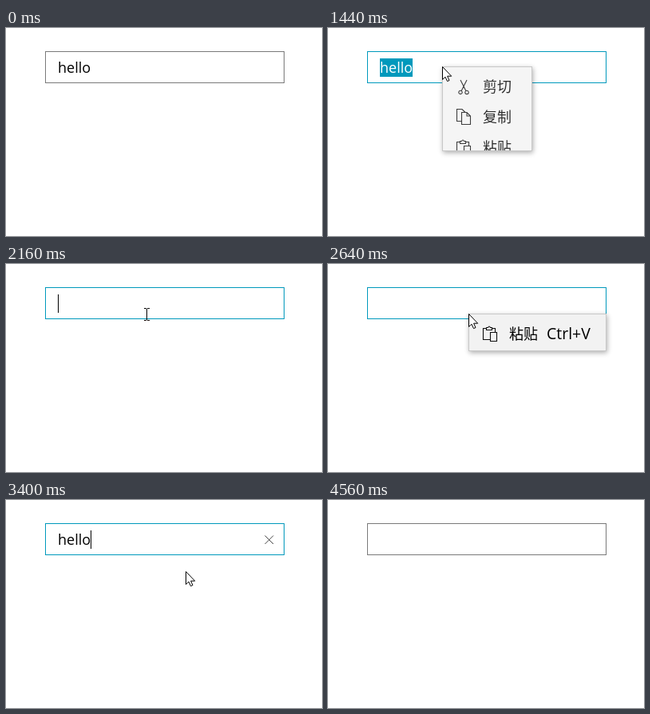
An HTML page that plays this animation: 396 px wide and 260 px high, repeating every 4.92 s.

```html
<!DOCTYPE html>
<html lang="zh-CN">
<head>
<meta charset="utf-8">
<style>
  html, body { margin: 0; width: 100%; height: 100%; overflow: hidden; background: #fff; }
  body { position: relative; }
  body > * { position: absolute; }
  svg { display: block; overflow: visible; }
  #scene { left: 0; top: 0; width: 396px; height: 260px; }
  .latin { font-family: "Open Sans", "Noto Sans", sans-serif; }
  .han { font: 18px "Noto Sans CJK SC", "Noto Sans CJK", sans-serif; }
  .menu { box-sizing: border-box; border: 1px solid #c8c8c8; overflow: hidden;
          box-shadow: 1px 2px 6px rgba(0, 0, 0, .32); }
  .menu svg { position: absolute; left: -1px; top: -1px; }
  .line { fill: none; stroke: #111; stroke-width: 1.1; }
</style>
</head>
<body>
<svg id="scene">
  <rect id="field" x="49.5" y="29.5" width="299" height="39" fill="#fff"/>
  <rect id="selection" x="65" y="38" width="41" height="23" fill="#0099bc"/>
  <text id="word" class="latin" x="65" y="56" font-size="18">hello</text>
  <g id="clear">
    <rect id="button" x="311" y="30" width="37" height="38"/>
    <path id="cross" d="M324.5 44.5l10.5 10.5M335 44.5l-10.5 10.5" fill="none"/>
  </g>
  <rect id="caret" y="38" width="1" height="23"/>
</svg>
<svg id="pointer" width="14" height="20" style="left:0;top:0">
  <path id="arrow" d="M.5.5V16.5L4 13.2L6.5 18.6L9 17.5L6.6 12.2H11.7Z" fill="#fff" stroke="#000"/>
  <path id="beam" d="M-3-6.5H0M1-6.5H4M.5-6V8M-3 8.5H0M1 8.5H4" fill="none" stroke="#000"/>
</svg>
<script>
const $ = id => document.getElementById(id);
const LOOP = 4920, STEP = 40, ACCENT = '#0099bc';
const clamp = v => Math.max(0, Math.min(1, v));
const show = (el, on) => el.style.display = on ? '' : 'none';

const icons = {
  cut: 'M5 2L11.8 15.4M13 2L6.2 15.4M7.2 17.4a2.2 2.2 0 1 1-4.4 0a2.2 2.2 0 1 1 4.4 0M15.2 17.4a2.2 2.2 0 1 1-4.4 0a2.2 2.2 0 1 1 4.4 0',
  copy: 'M6.5 15.5H.5V.5H7L11 4.5M6.5 4.5H13L17.5 9V19.5H6.5ZM13 4.5V9H17.5',
  paste: 'M9.5 17.5H.5V3.5H4.5M11.5 3.5H15.5V8.5M4.5 5.5V2.5H6.5Q8 -.5 9.5 2.5H11.5V5.5ZM9.5 8.5H17.5V19.5H9.5Z',
  undo: 'M1.5 1V7.5H8M1.5 7.5C6 0 16.5 1.5 16.5 8.5C16.5 13 10 15.5 6 20',
  none: ''
};

function makeMenu(x, y, width, keyX, rows) {
  const el = document.createElement('div');
  el.className = 'menu';
  el.style.left = x + 'px';
  el.style.top = y + 'px';
  const items = rows.map(([icon, label, key], i) => `
    <g transform="translate(0 ${6 + 38 * i})">
      <path class="line" transform="translate(18 9)" d="${icons[icon]}"/>
      <text class="han" x="51" y="26">${label}</text>
      <text class="latin" x="${keyX}" y="26" font-size="19.5">Ctrl+${key}</text>
    </g>`).join('');
  el.innerHTML = `<svg width="${width}" height="${38 * rows.length + 10}">
    <rect x="1" y="6" width="${width - 2}" height="38" fill="#dadada"/><g>${items}</g></svg>`;
  document.body.insertBefore(el, $('pointer'));
  return { el, width, height: 38 * rows.length + 10,
           hover: el.querySelector('rect'), content: el.querySelector('g') };
}

function drawMenu(menu, t, start, hover, end) {
  const fade = clamp((t - start) / 100);
  const grow = 1 - .5 * (1 - clamp((t - start - 75) / 250)) ** 3;
  const shade = Math.round(257 - 15 * fade);
  show(menu.el, fade > 0 && t < end);
  show(menu.hover, t >= hover);
  menu.el.style.width = Math.round(menu.width * grow) + 'px';
  menu.el.style.height = Math.round(menu.height * grow) + 'px';
  menu.el.style.background = `rgb(${shade},${shade},${shade})`;
  menu.content.style.opacity = fade;
}

const paste = ['paste', '粘贴', 'V'];
const fullMenu = makeMenu(143, 48, 213, 134, [
  ['cut', '剪切', 'X'], ['copy', '复制', 'C'], paste,
  ['undo', '取消操作', 'Z'], ['none', '全选', 'A']
]);
const pasteMenu = makeMenu(176, 62, 176, 98, [paste]);

// Pointer path: time, x, y
const path = [
  [360, 149, 58], [440, 143, 48], [1680, 143, 48], [1840, 155, 51], [1880, 160, 54],
  [2000, 174, 62], [2120, 174, 62], [2160, 176, 62], [2680, 176, 62], [2800, 200, 72],
  [2920, 215, 80], [3120, 225, 89], [3560, 225, 89], [4080, 332, 58], [LOOP, 332, 58]
];

function pointerAt(t) {
  const i = Math.max(1, path.findIndex(p => p[0] >= t));
  const [t0, x0, y0] = path[i - 1], [t1, x1, y1] = path[i];
  const p = clamp((t - t0) / (t1 - t0));
  return [Math.round(x0 + (x1 - x0) * p), Math.round(y0 + (y1 - y0) * p)];
}

function draw(t) {
  const within = (a, b) => t >= a && t < b;
  const selected = within(600, 2160);
  const pressed = t >= 4080;

  $('field').setAttribute('stroke',
    within(600, 4560) ? ACCENT : within(400, 600) ? '#333' : '#7a7a7a');
  show($('selection'), selected);
  show($('word'), t < 2160 || within(3400, 4280));
  $('word').setAttribute('fill', selected ? '#fff' : '#000');
  show($('caret'), within(680, 1160) || within(2160, 2400) || within(3400, 3920));
  $('caret').setAttribute('x', within(2160, 2400) ? 65 : 106);

  show($('clear'), within(680, 1360) || within(3400, 4280));
  $('button').setAttribute('fill', pressed ? ACCENT : '#fff');
  $('cross').setAttribute('stroke', pressed ? '#fff' : t >= 4000 ? ACCENT : '#444');

  drawMenu(fullMenu, t, 1360, 1880, 2160);
  drawMenu(pasteMenu, t, 2400, 2760, 3400);

  const [x, y] = pointerAt(t);
  const arrow = within(1360, 2160) || within(2400, 4280);
  show($('pointer'), within(360, 4560));
  $('pointer').style.transform = `translate(${x}px, ${y}px)`;
  show($('arrow'), arrow);
  show($('beam'), !arrow);
}

const begin = performance.now();
function tick() {
  const t = (performance.now() - begin) % LOOP;
  draw(Math.floor(t / STEP) * STEP);
  requestAnimationFrame(tick);
}
tick();
</script>
</body>
</html>
```
